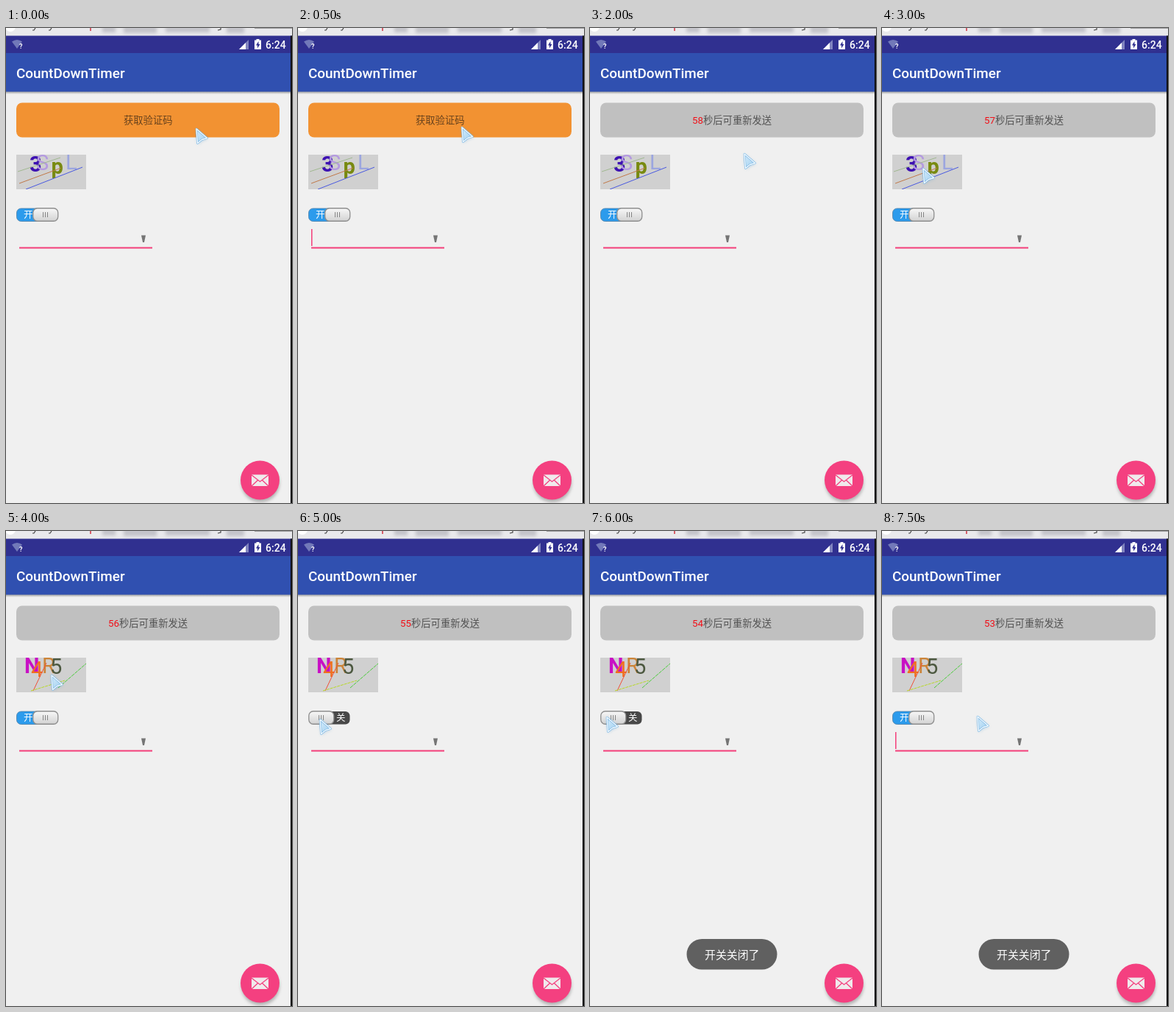
An HTML page that plays this animation: 389x645 px, repeating every 8 s.

```html
<!DOCTYPE html>
<html lang="zh-CN">
<head>
<meta charset="utf-8">
<title>CountDownTimer</title>
<style>
html, body { margin: 0; width: 100%; height: 100%; overflow: hidden; background: #f0f0f0; }
svg { display: block; width: 389px; height: 645px; }
text { font-family: Roboto, "Noto Sans CJK SC", "Noto Sans CJK", sans-serif; }
.label { font-size: 13.3px; }
.code { font-size: 29px; }
.bold { font-weight: 700; }

/* Every part changes in hard steps on an 8 s loop; 6.25% is half a second. */
.anim { animation: 8s step-end infinite; }
#ready { animation-name: ready; }
#waiting { animation-name: waiting; }
#digits { animation-name: count; }
#codeA { animation-name: codeA; }
#codeB { animation-name: codeB; }
#on { animation-name: on; }
#off { animation-name: off; }
#toast { animation-name: toast; }
#pointer { animation-name: pointer; }
#caret { animation: blink 1s step-end infinite; }

@keyframes blink { 0% { opacity: 0 } 50%, 100% { opacity: 1 } }
@keyframes ready { 0% { opacity: 1 } 12.5%, 100% { opacity: 0 } }
@keyframes waiting { 0% { opacity: 0 } 12.5%, 100% { opacity: 1 } }
@keyframes codeA { 0% { opacity: 1 } 43.75%, 100% { opacity: 0 } }
@keyframes codeB { 0% { opacity: 0 } 43.75%, 100% { opacity: 1 } }
@keyframes on { 0% { opacity: 1 } 62.5% { opacity: 0 } 87.5%, 100% { opacity: 1 } }
@keyframes off { 0% { opacity: 0 } 62.5% { opacity: 1 } 87.5%, 100% { opacity: 0 } }
@keyframes toast { 0% { opacity: 0 } 68.75% { opacity: .7 } 75%, 100% { opacity: 1 } }
@keyframes count {
  0% { transform: translateY(0) }
  25% { transform: translateY(-30px) }
  37.5% { transform: translateY(-60px) }
  50% { transform: translateY(-90px) }
  62.5% { transform: translateY(-120px) }
  75% { transform: translateY(-150px) }
  87.5%, 100% { transform: translateY(-180px) }
}
@keyframes pointer {
  0% { transform: translate(258px, 136px) }
  6.25% { transform: translate(222px, 134px) }
  12.5% { transform: translate(216px, 132px) }
  18.75% { transform: translate(216px, 134px) }
  25% { transform: translate(209px, 170px) }
  31.25% { transform: translate(56px, 190px) }
  37.5% { transform: translate(55px, 190px) }
  43.75% { transform: translate(58px, 193px) }
  50% { transform: translate(61px, 195px) }
  56.25% { transform: translate(36px, 250px) }
  62.5% { transform: translate(29px, 255px) }
  68.75% { transform: translate(25px, 254px) }
  75% { transform: translate(22px, 252px) }
  81.25% { transform: translate(32px, 253px) }
  87.5% { transform: translate(33px, 253px) }
  93.75%, 100% { transform: translate(129px, 251px) }
}
</style>
</head>
<body>
<svg viewBox="0 0 389 645">
  <defs>
    <linearGradient id="knob" x2="0" y2="1">
      <stop stop-color="#f8f8f8"/><stop offset="1" stop-color="#d2d2d2"/>
    </linearGradient>
    <linearGradient id="shade" x2="0" y2="1">
      <stop stop-color="#9a9a9a"/><stop offset="1" stop-color="#f0f0f0"/>
    </linearGradient>
    <linearGradient id="ice" x2="1" y2="1">
      <stop stop-color="#d4ecfb"/><stop offset="1" stop-color="#9fcdee"/>
    </linearGradient>
    <filter id="soft" x="-50%" y="-50%" width="200%" height="200%"><feGaussianBlur stdDeviation="2"/></filter>
    <clipPath id="window"><rect x="130" y="112" width="40" height="26"/></clipPath>
    <clipPath id="codeBox"><rect x="14" y="172" width="95" height="47"/></clipPath>
    <clipPath id="strip"><rect width="389" height="10"/></clipPath>
    <g id="thumb">
      <rect x=".75" y=".75" width="34" height="17.5" rx="6" fill="url(#knob)" stroke="#8e8e8e" stroke-width="1.3"/>
      <path d="M14.5 6v7M17.5 6v7M20.5 6v7" stroke="#858585"/>
    </g>
  </defs>

  <rect width="389" height="645" fill="#f0f0f0"/>

  <!-- Edge of the window behind -->
  <g clip-path="url(#strip)">
    <rect width="389" height="10" fill="#e9e9ec"/>
    <circle cx="6" cy="-2" r="7" fill="#fff"/>
    <g filter="url(#soft)" fill="#c3c3c9">
      <rect x="131" y="-2" width="18" height="8"/><rect x="160" y="-2" width="45" height="9"/>
      <rect x="217" y="-2" width="60" height="8"/><rect x="300" y="-2" width="24" height="9"/>
    </g>
    <path d="M40 0l-2 3h-2M62 0l-2 3h-2M292 0v2l-4 1" fill="none" stroke="#444" stroke-width="1.2"/>
    <path d="M115 0v4" stroke="#d03040" stroke-width="1.5"/>
    <path d="M338 0h51" stroke="#555"/>
  </g>

  <!-- Status bar -->
  <rect y="10.5" width="389" height="24" fill="#303090"/>
  <path d="M8 18.500Q15 13.500 22 18.500L15 28Z" fill="#7279b9"/>
  <text x="18" y="27.500" font-size="9" font-weight="700" fill="#fff">?</text>
  <path d="M330 16V29H317Z" fill="#8084bf"/>
  <path d="M326 20V29H317Z" fill="#fff"/>
  <path d="M340.500 15h4v1.500h2.500V29h-9V16.500h2.500Z" fill="#fff"/>
  <path d="M343.500 18l-3.500 5.500h2v4l3.500-5.500h-2Z" fill="#303090"/>
  <text x="353" y="28" font-size="14" font-weight="500" fill="#fff">6:24</text>

  <!-- App bar -->
  <rect y="86" width="389" height="4" fill="url(#shade)"/>
  <rect y="34" width="389" height="52.500" fill="#3050b0"/>
  <text x="14" y="67.500" font-size="18.900" font-weight="500" fill="#fff">CountDownTimer</text>

  <!-- Send button -->
  <g id="ready" class="anim">
    <rect x="14" y="101.500" width="358" height="47" rx="8" fill="#f29232"/>
    <text class="label" x="160" y="130" fill="#69431d">获取验证码</text>
  </g>
  <g id="waiting" class="anim">
    <rect x="14" y="101.500" width="358" height="47" rx="8" fill="#c0c0c0"/>
    <g clip-path="url(#window)">
      <g id="digits" class="anim label" fill="#f01018">
        <text x="139" y="130">60</text><text x="139" y="160">58</text>
        <text x="139" y="190">57</text><text x="139" y="220">56</text>
        <text x="139" y="250">55</text><text x="139" y="280">54</text>
        <text x="139" y="310">53</text>
      </g>
    </g>
    <text class="label" x="154" y="130" fill="#525252">秒后可重新发送</text>
  </g>

  <!-- Captcha -->
  <rect x="14" y="172" width="95" height="47" fill="#d0d0d0"/>
  <g clip-path="url(#codeBox)">
    <g id="codeA" class="anim code">
      <text class="bold" x="32" y="195" fill="#3d10b2">3</text>
      <text x="41" y="193" fill="#b49ae0">S</text>
      <text class="bold" x="61.500" y="198" fill="#788a10">p</text>
      <text x="81" y="192" fill="#9ca6df">L</text>
      <path d="M16 195L74 176" stroke="#a0b890"/>
      <path d="M18 211L75 190" stroke="#c07848"/>
      <path d="M27 219L104 189" stroke="#4858e0"/>
    </g>
    <g id="codeB" class="anim code">
      <text class="bold" x="25" y="193" fill="#c810c4">N</text>
      <text x="34" y="198" fill="#f07020">4</text>
      <text x="49" y="193" fill="#cc8438">R</text>
      <text x="60" y="194" fill="#4c5840">5</text>
      <path d="M37 217L55 179" stroke="#f05038"/>
      <path d="M34 217L80 203" stroke="#b8d828" stroke-dasharray="4 1"/>
      <path d="M71 213L109 180" stroke="#48cc38" stroke-dasharray="5 1"/>
    </g>
  </g>

  <!-- Switch -->
  <g id="on" class="anim">
    <rect x="14.500" y="245" width="44" height="17.500" rx="6" fill="#2c9bec" stroke="#4c7ea6" stroke-width=".8"/>
    <text x="24" y="258" font-size="12.500" fill="#fff">开</text>
    <use href="#thumb" x="36" y="244"/>
  </g>
  <g id="off" class="anim">
    <rect x="28" y="245" width="42.500" height="17.500" rx="6" fill="#484848"/>
    <text x="52" y="258" font-size="12.500" fill="#fff">关</text>
    <use href="#thumb" x="14" y="244"/>
  </g>

  <!-- Text field -->
  <path d="M184 281.500h6l-2 9.500h-2Z" fill="#757575"/>
  <rect x="18" y="297.500" width="181" height="2" fill="#f43f7b"/>
  <rect id="caret" x="18" y="273" width="1.500" height="23" fill="#f43f7b"/>

  <!-- Toast -->
  <g id="toast" class="anim">
    <rect x="131.500" y="554" width="123" height="41.500" rx="20.700" fill="#606060"/>
    <text x="156" y="580.500" font-size="14.900" fill="#fff">开关关闭了</text>
  </g>

  <!-- Mail button -->
  <circle cx="346" cy="618" r="26" fill="#888" opacity=".6" filter="url(#soft)"/>
  <circle cx="345.500" cy="614" r="26.500" fill="#f44080"/>
  <rect x="334" y="606.500" width="23" height="15.500" fill="#f0eaec"/>
  <path d="M334 607l11.500 9 11.500-9M334 622l8.500-8M357 622l-8.500-8" fill="none" stroke="#f44080" stroke-width="1.300"/>

  <rect x="387" y="10.500" width="2" height="635" fill="#101014"/>

  <g id="pointer" class="anim">
    <path d="M1 2L16 14.500L9 16.500L3 21.500Z" fill="#5a9ccc" opacity=".5" filter="url(#soft)"/>
    <path d="M1 1L15.500 13.500L8.500 15.500L2.500 20.500Z" fill="url(#ice)" stroke="#78b4e2" stroke-width="2.600" stroke-linejoin="round"/>
    <path d="M1 1L15.500 13.500L8.500 15.500L2.500 20.500Z" fill="none" stroke="#f2faff" stroke-width="1.400" stroke-linejoin="round"/>
  </g>
</svg>
</body>
</html>
```
